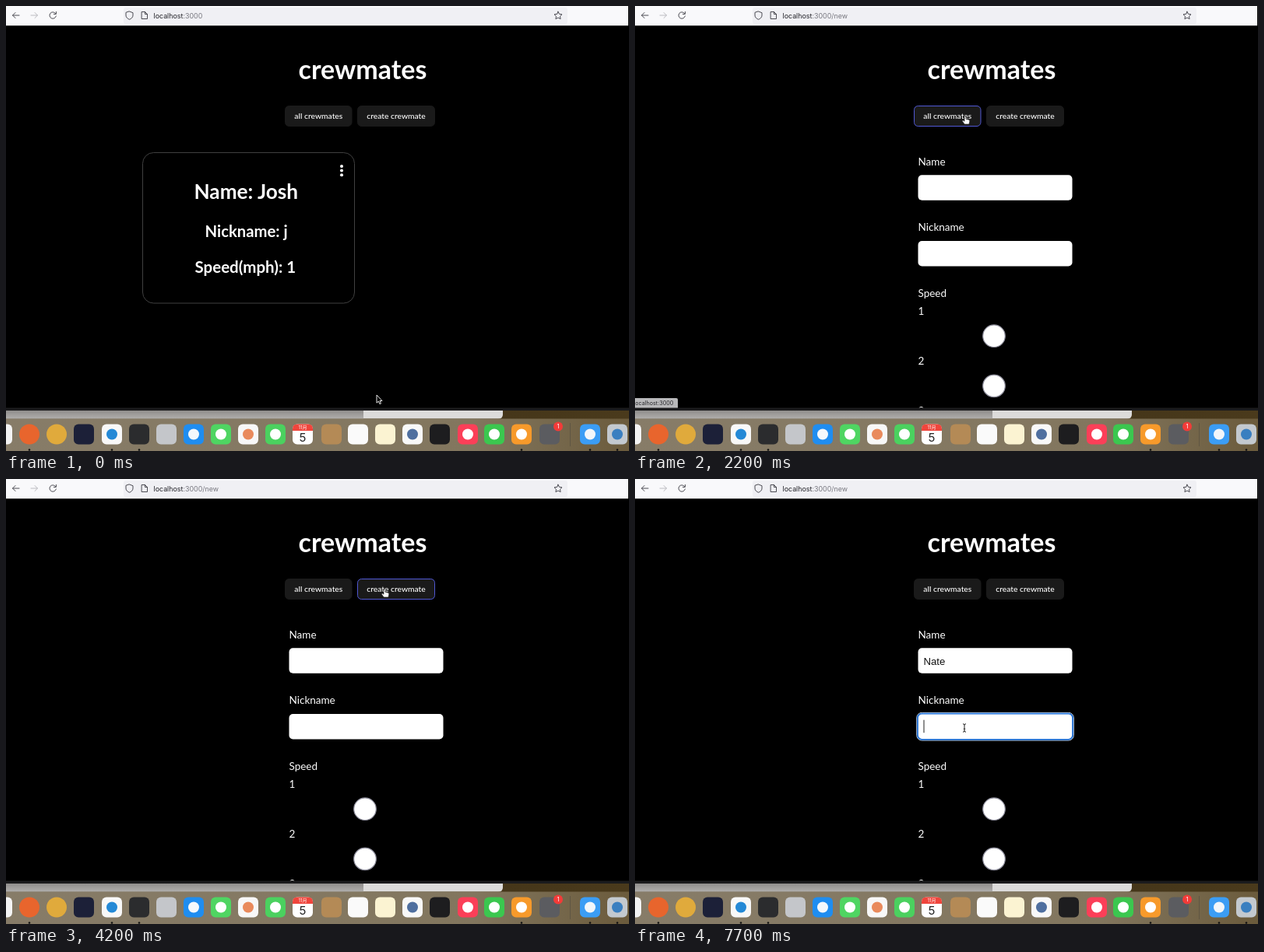
An HTML page that plays this animation: 800x572 px, repeating every 8000 ms.

```html
<!DOCTYPE html>
<html lang="en">
<head>
<meta charset="utf-8">
<title>crewmates</title>
<style>
html, body { margin: 0; width: 100%; height: 100%; overflow: hidden; background: #000; }
svg { display: block; width: 100%; height: 100%; }
text { font-family: Lato, "Open Sans", sans-serif; fill: #fff; }
.ui { font-family: Inter, Roboto, "Noto Sans CJK SC", sans-serif; }
.bold { font-weight: 700; }
.btn text { font-size: 10.3px; font-weight: 500; text-anchor: middle; }
.btn rect { fill: #1a1a1a; stroke: #1a1a1a; }
.btn.hover rect { stroke: #5058d4; }
.label { font-size: 13.5px; }
.typed { font: 13.2px "Liberation Sans", Arial, sans-serif; fill: #111; }
.line { fill: none; stroke: #4b4b52; stroke-width: 1; stroke-linecap: round; stroke-linejoin: round; }
.field .ring { fill: #fff; stroke: #2a78dc; stroke-width: 1.8; }
.field .glow { fill: none; stroke: #cfe3fb; stroke-width: 1; }
</style>
</head>
<body>
<svg viewBox="0 0 800 572" xmlns="http://www.w3.org/2000/svg">
  <defs>
    <linearGradient id="dock">
      <stop offset="0" stop-color="#877c68"/>
      <stop offset=".75" stop-color="#82765e"/>
      <stop offset="1" stop-color="#6b5b3c"/>
    </linearGradient>
    <linearGradient id="hill">
      <stop offset="0" stop-color="#33270f"/>
      <stop offset="1" stop-color="#4a3a1c"/>
    </linearGradient>
    <linearGradient id="shade" x2="0" y2="1">
      <stop offset="0" stop-color="#8f8d8b"/>
      <stop offset="1" stop-color="#b0aeac"/>
    </linearGradient>
    <clipPath id="page"><rect y="25" width="800" height="491.5"/></clipPath>
  </defs>

  <rect width="800" height="572"/>

  <!-- browser bar -->
  <rect width="799" height="25.2" fill="#f9f9fb"/>
  <rect x="151" y="2" width="570" height="21" rx="3" fill="#f0f0f4"/>
  <path class="line" d="M17 12H8.5M12 8.5L8.5 12L12 15.5"/>
  <path class="line" style="stroke:#bbbbc0" d="M32 12H40.5M37 8.5L40.5 12L37 15.5"/>
  <path class="line" d="M63.6 9.5A4.2 4.2 0 1 0 64.3 13M64.4 7.4V10.4H61.4"/>
  <path class="line" d="M158.5 7L163 8.7V12C163 14.6 161 16.3 158.5 17.3C156 16.3 154 14.6 154 12V8.7Z"/>
  <path class="line" d="M174.5 7.5H178.5L181.5 10.5V16.5H174.5ZM178.5 7.5V10.5H181.5"/>
  <path class="line" d="M709 7.2L710.5 10.3L714 10.8L711.5 13.2L712.1 16.6L709 15L705.9 16.6L706.5 13.2L704 10.8L707.5 10.3Z"/>
  <text class="ui" x="189.500" y="15.500" font-size="8.900" style="fill:#222228">localhost<tspan fill="#77777f">:3000</tspan><tspan id="path" fill="#77777f">/new</tspan></text>

  <!-- page -->
  <g clip-path="url(#page)">
    <text class="bold" x="458" y="94" font-size="34" text-anchor="middle">crewmates</text>
    <g class="btn" id="all"><rect x="358.500" y="128.500" width="85.500" height="26" rx="5"/><text x="401.300" y="144.700">all crewmates</text></g>
    <g class="btn" id="create"><rect x="451.500" y="128.500" width="99" height="26" rx="5"/><text x="501" y="144.700">create crewmate</text></g>

    <g id="list">
      <rect x="175.500" y="188.500" width="272" height="193.500" rx="14" fill="none" stroke="#404040"/>
      <g fill="#fff"><circle cx="431" cy="206" r="2"/><circle cx="431" cy="211.600" r="2"/><circle cx="431" cy="217.200" r="2"/></g>
      <text class="bold" x="241.500" y="247.500" font-size="26.200">Name: Josh</text>
      <text class="bold" x="255.500" y="296.500" font-size="20.300">Nickname: j</text>
      <text class="bold" x="242.500" y="342.500" font-size="20.500">Speed(mph): 1</text>
    </g>

    <g id="form">
      <text class="label" x="363.500" y="204.700">Name</text>
      <text class="label" x="363.500" y="289.200">Nickname</text>
      <text class="label" x="363.500" y="374">Speed</text>
      <text class="label" x="363.500" y="396.500">1</text>
      <text class="label" x="363.500" y="460.700">2</text>
      <text class="label" x="363.500" y="524.700">3</text>
      <g fill="#fff" stroke="#8f8f9d" stroke-width="1.200"><circle cx="461" cy="424.200" r="14.300"/><circle cx="461" cy="488.400" r="14.300"/></g>
      <g class="field" id="nameField"></g>
      <g class="field" id="nickField" transform="translate(0 84.700)"></g>
    </g>
  </g>

  <g id="status">
    <path d="M0 504H53Q55 504 55 506V517H0Z" fill="#b9b9bb"/>
    <text class="ui" x="-1.500" y="513.300" font-size="7.200" style="fill:#26262a">localhost:3000</text>
  </g>

  <!-- desktop and dock -->
  <rect y="516.500" width="800" height="4" fill="#1b1b1d"/>
  <rect y="520" width="800" height="52" fill="url(#hill)"/>
  <path d="M0 520H638V525Q638 530.500 632 530.500H0Z" fill="#dcdbda"/>
  <rect y="520" width="459" height="10.500" fill="url(#shade)"/>
  <rect y="530.500" width="800" height="41.500" fill="url(#dock)"/>
  <rect x="724" y="536" width="1" height="30" fill="#5f5643"/>
  <g id="icons"></g>

  <g id="pointer">
    <path id="arrow" d="M0 0V10.200L2.300 8.100L3.900 11.600L5.500 10.900L4 7.500H7Z" fill="#000" stroke="#fff" stroke-width=".9"/>
    <path id="hand" d="M-1 .8Q0-.6 1 .8V4.200L5 5.200Q6 5.600 5.800 7.200L5 11H-.8L-3.600 7.200Q-3.800 5.800-2.500 6L-1 7.200Z" fill="#fff" stroke="#222" stroke-width=".7"/>
    <path id="beam" d="M-2-5.200Q0-5.200 0-3.800Q0-5.200 2-5.200M0-4V4M-2 5.200Q0 5.200 0 3.800Q0 5.200 2 5.200M-1.200 1.200H1.200" fill="none" stroke="#222" stroke-width="1"/>
  </g>
</svg>
<script>
const LOOP = 8000, STEP = 100;
const $ = id => document.getElementById(id);
const show = (id, on) => { $(id).style.display = on ? '' : 'none'; };

// x, tile colour, colour of the plain disc on it
const apps = [
  [-5, '#f4f4f4'], [30, '', '#e8652d'], [65, '', '#e0aa3c'], [100, '#1c2038'], [136, '#f8f8f8', '#2489d6'],
  [171, '#2b2c2e'], [206, '#c4c6ca'], [241, '#1f8df0', '#f4f8fc'], [276, '#4fd562', '#fff'], [311, '#f7f7f7', '#e98a5c'],
  [346, '#4bd15f', '#fff'], [381, '#fff'], [418, '#b48a56'], [452, '#fafafa'], [487, '#fbf3d2'],
  [522, '#f8f8f8', '#4f6f9f'], [557, '#1d1d1f'], [593, '#fb3f58', '#fff'], [627, '#3bc74f', '#fff'], [662, '#f79a2b', '#fff'],
  [698, '#5b5c60'], [750, '#3b9df5', '#f2f6fa'], [785, '#c3c9cf', '#3a7fc0']
];
const running = [30, 136, 171, 662, 750, 785];
const label = (x, y, size, color, s) =>
  `<text class="ui" x="${x}" y="${y}" font-size="${size}" text-anchor="middle" style="fill:${color}">${s}</text>`;
const icon = ([x, tile, disc]) =>
  (tile ? `<rect x="${x - 13}" y="537.5" width="26" height="26" rx="6" fill="${tile}"/>` : '') +
  (disc ? `<circle cx="${x}" cy="550.5" r="${tile ? 7 : 13}" fill="${disc}"/>` : '');

$('icons').innerHTML =
  apps.map(icon).join('') +
  running.map(x => `<circle cx="${x}" cy="570.5" r="1.3" fill="#111"/>`).join('') +
  '<path d="M368 546V543.5Q368 537.5 374 537.5H388Q394 537.5 394 543.5V546Z" fill="#f0453c"/>' +
  label(381, 544.3, 6, '#fff', '11月') +
  label(381, 559.5, 15, '#222', '5') +
  '<circle cx="709" cy="540.5" r="6" fill="#f23b38"/>' + label(709, 543.3, 7.5, '#fff', '1');

for (const id of ['nameField', 'nickField']) {
  $(id).innerHTML =
    `<rect x="363.5" y="217.3" width="198" height="32.4" rx="5" fill="#fff"/>
     <g class="focus"><rect class="glow" x="361.8" y="215.7" width="201.5" height="35.6" rx="6.5"/>
     <rect class="ring" x="363" y="216.9" width="199" height="33.2" rx="5.5"/></g>
     <text class="typed" x="370.5" y="238.5"></text>
     <rect class="caret" x="370.5" y="225" width="1" height="16.5" fill="#222"/>`;
}

// pointer way points: time, x, y
const way = [
  [0, 476, 500], [100, 476, 500], [200, 489, 468], [300, 532, 380], [400, 564, 301], [500, 564, 301],
  [700, 548, 232], [900, 505, 152], [1000, 493, 139], [1700, 493, 139], [1900, 458, 141], [2100, 424, 141],
  [2500, 424, 141], [2800, 362, 163], [3100, 312, 180], [3200, 310, 181], [3500, 322, 180],
  [3700, 390, 162], [3900, 475, 143], [4000, 486, 141], [4400, 486, 141], [4700, 452, 185],
  [4900, 425, 236], [7100, 425, 236], [7300, 424, 264], [7500, 423, 320], [8000, 423, 320]
];
const typing = [[5600, 'N'], [6200, 'Na'], [6600, 'Nat'], [6700, 'Nate']];

function place(t) {
  const i = Math.max(1, way.findIndex(w => w[0] >= t));
  const [t0, x0, y0] = way[i - 1], [t1, x1, y1] = way[i];
  const k = (t - t0) / (t1 - t0);
  return [x0 + (x1 - x0) * k, y0 + (y1 - y0) * k];
}
const inside = (x, y, l, t, r, b) => x >= l && x <= r && y >= t && y <= b;
const within = (t, a, b) => t >= a && t < b;

function setField(id, value, focused) {
  const f = $(id), text = f.querySelector('text'), caret = f.querySelector('.caret');
  text.textContent = value;
  f.querySelector('.focus').style.display = caret.style.display = focused ? '' : 'none';
  if (focused) caret.setAttribute('x', 370.5 + (value ? text.getComputedTextLength() : 0));
}

function draw(t) {
  const form = within(t, 1100, 2300) || t >= 4100;
  const [x, y] = place(t);
  const onAll = inside(x, y, 358, 128, 444, 155);
  const onCreate = inside(x, y, 451, 128, 551, 155);
  const onField = form && (inside(x, y, 363, 217, 562, 250) || inside(x, y, 363, 302, 562, 335));

  show('form', form);
  show('list', !form);
  show('path', form);
  show('status', form && onAll);
  $('all').classList.toggle('hover', onAll);
  $('create').classList.toggle('hover', onCreate);

  show('pointer', !within(t, 5500, 7200));
  show('hand', onAll || onCreate);
  show('beam', onField);
  show('arrow', !onAll && !onCreate && !onField);
  $('pointer').setAttribute('transform', `translate(${x} ${y})`);

  const name = typing.reduce((s, [at, v]) => t >= at ? v : s, '');
  setField('nameField', name, within(t, 5000, 7600));
  setField('nickField', '', t >= 7600);
}

const start = performance.now();
function tick() {
  const t = (performance.now() - start) % LOOP;
  draw(Math.floor(t / STEP) * STEP);
  requestAnimationFrame(tick);
}
tick();
</script>
</body>
</html>
```
